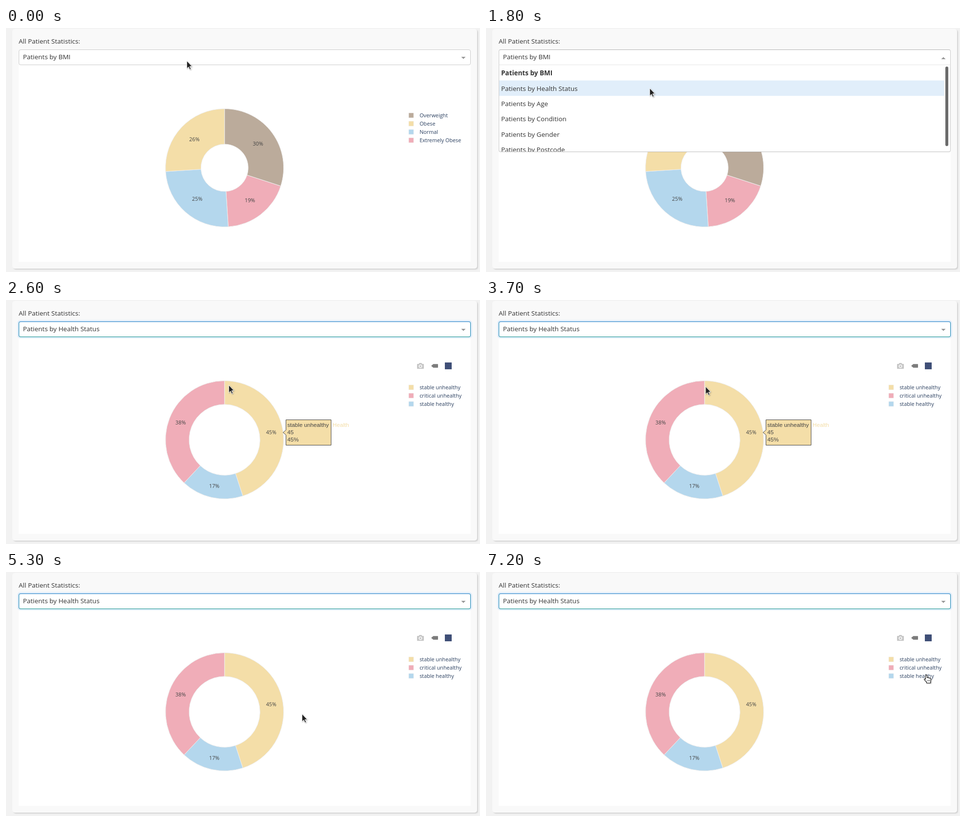
Recreate the animation shown at these times as an HTML page. Size 971x500 px, loop 8000 ms.

```html
<!DOCTYPE html>
<html lang="en">
<head>
<meta charset="utf-8">
<title>Patient statistics</title>
<style>
  html, body { margin: 0; width: 100%; height: 100%; overflow: hidden; background: #f2f2f2; }
  div { position: absolute; box-sizing: border-box; }
  .panel { left: 13px; top: 2px; width: 952px; height: 491px; border-radius: 5px; background: #f9f9f9; box-shadow: 2px 2px 2px lightgrey; }
  .plot { left: 26px; top: 76px; width: 926px; height: 403px; background: #fff; }
  .select { left: 26px; top: 44px; width: 926px; height: 32px; border: 1px solid #ccc; border-radius: 4px; background: #fff; }
  .select.open { border-color: #b3b3b3 #ccc #e2e2e2; border-radius: 4px 4px 0 0; }
  .select.focus { border-color: #1478c4 #1282ae #0b8c86; box-shadow: 0 0 0 3px rgba(0, 126, 255, .1); }
  .menu { left: 26px; top: 75px; width: 926px; height: 179px; border: 1px solid #ccc; border-top-color: #e6e6e6; border-radius: 0 0 4px 4px; background: #fff; box-shadow: 0 1px 0 rgba(0, 0, 0, .06); }
  svg { position: absolute; left: 0; top: 0; font-family: "Open Sans", sans-serif; }
  .ui { font-size: 13.5px; fill: #333; }
  .chart { font-size: 10.8px; }
  .tip { font: 11.7px "Liberation Sans", Arial, sans-serif; }
</style>
</head>
<body>
<div class="panel"></div>
<div class="plot"></div>
<div class="select" id="select"></div>
<svg width="971" height="500" viewBox="0 0 971 500">
  <g class="ui">
    <text x="26" y="32">All Patient Statistics:</text>
    <text id="value" x="34.7" y="64"></text>
  </g>
  <path id="caret" fill="#999"/>
  <g id="bmi" class="chart"></g>
  <g id="status" class="chart"></g>
  <g id="modebar">
    <path fill="#444" opacity=".3" fill-rule="evenodd" d="M843 131h2.500l1.200-2h4.600l1.200 2h2.500q1 0 1 1v8q0 1-1 1h-12q-1 0-1-1v-8q0-1 1-1z M849 132.200a3.500 3.500 0 1 0 .01 0z M849 133.700a2 2 0 1 1-.01 0z"/>
    <path fill="#444" opacity=".7" d="M871 135l4.300-3.700h9q.7 0 .7.700v6q0 .7-.7.700h-9z"/>
    <rect x="899" y="128" width="14" height="14" fill="#3f4f77"/>
  </g>
  <g id="tips" class="tip"></g>
</svg>
<div class="menu" id="menu"></div>
<svg width="971" height="500" viewBox="0 0 971 500">
  <clipPath id="inside"><rect x="27" y="76" width="924" height="177.300"/></clipPath>
  <g id="list" class="ui" clip-path="url(#inside)">
    <rect id="highlight" x="27" width="911.500" height="31.500" fill="#e1eefa"/>
    <rect x="941" y="79" width="6" height="163" rx="3" fill="#6b6b6b"/>
  </g>
  <g id="arrow" style="filter:drop-shadow(1px 1px 1px rgba(0,0,0,.3))">
    <path d="M.3.3V16.200L4 12.800l2.500 5.600 2.500-1.100-2.500-5.500h4.700z" fill="#222" stroke="#fff" stroke-width="1"/>
  </g>
  <g id="hand" style="filter:drop-shadow(1px 1px 1px rgba(0,0,0,.3))">
    <path d="M5.500 10V2.400a1.500 1.500 0 0 1 3 0V6.500l1.500-.3 1 .8 1.500-.2 1 .9 1.200-.1q1.800.4 1.800 2.600l-.8 4V17.500H7.500V15.500L3 10.800q-.8-1.500.7-1.900Q4.600 8.800 5.500 10z" fill="#fff" stroke="#222" stroke-width="1.200" stroke-linejoin="round"/>
    <path d="M9 14v-3M11.500 14v-3M13.500 14v-3" stroke="#222" stroke-width=".7"/>
  </g>
</svg>
<script>
const $ = id => document.getElementById(id);
const LOOP = 8000, STEP = 100;
const CX = 447.7, CY = 286.5, R = 121;
const BROWN = '#bbab9b', YELLOW = '#f4dea8', BLUE = '#b4d7ed', PINK = '#f0adb8';

const add = (parent, markup) => parent.insertAdjacentHTML('beforeend', markup);
const show = (el, on) => { el.style.display = on ? '' : 'none'; };
const text = (x, y, s, attrs = '') => `<text x="${x}" y="${y}" ${attrs}>${s}</text>`;
const polar = (share, r) => {
  const a = share * Math.PI / 50;
  return [CX + r * Math.sin(a), CY - r * Math.cos(a)];
};

// Slices are [name, percent, colour], clockwise from the top.
function donut(group, slices, hole) {
  const inner = R * hole, mid = (R + inner) / 2;
  let from = 0;
  const centres = {};
  for (const [name, pct, color] of slices) {
    const to = from + pct;
    add(group, `<path d="M${polar(from, R)}A${R} ${R} 0 0 1 ${polar(to, R)}L${polar(to, inner)}
      A${inner} ${inner} 0 0 0 ${polar(from, inner)}z" fill="${color}" stroke="#eee"/>`);
    const [x, y] = centres[name] = polar(from + pct / 2, mid);
    add(group, text(x, y + 3.9, pct + '%', 'text-anchor="middle" fill="#444"'));
    from = to;
  }
  [...slices].sort((a, b) => b[1] - a[1]).forEach(([name, , color], i) => {
    const y = Math.round(179 + 17.1 * i);
    add(group, `<rect x="825" y="${y - 5}" width="10" height="10" fill="${color}" stroke="#eee" stroke-width=".6"/>`);
    add(group, text(847.2, y + 4, name, 'fill="#2a3f5f"'));
  });
  return centres;
}

const statusSlices = [['stable unhealthy', 45, YELLOW], ['stable healthy', 17, BLUE], ['critical unhealthy', 38, PINK]];
donut($('bmi'), [['Overweight', 30, BROWN], ['Extremely Obese', 19, PINK], ['Normal', 25, BLUE], ['Obese', 26, YELLOW]], .4);
const centres = donut($('status'), statusSlices, .6);

const tipWidths = { 'stable unhealthy': 92.5, 'stable healthy': 79.5, 'critical unhealthy': 94.5 };
const tips = statusSlices.map(([name, pct, color]) => {
  const [cx, cy] = centres[name], w = tipWidths[name];
  const side = cx > CX ? 1 : -1;
  const x = cx + side * 24.2, y = Math.round(cy) + .5;
  const near = Math.round(x + side * 5) + .5, far = near + side * w;
  const left = Math.min(near, far) + 2.7;
  add($('tips'), `<g><path d="M${x} ${y}L${near} ${y - 5}V${y - 26}H${far}V${y + 26}H${near}V${y + 5}z" fill="${color}" stroke="#444"/>
    ${[name, pct, pct + '%'].map((s, i) => text(left, y - 11.5 + 15 * i, s, 'fill="#444"')).join('')}
    ${text(far + side * 3, y - 11.5, 'Health', `fill="${color}" text-anchor="${side > 0 ? 'start' : 'end'}"`)}</g>`);
  return $('tips').lastElementChild;
});

['BMI', 'Health Status', 'Age', 'Condition', 'Gender', 'Postcode'].forEach((s, i) =>
  add($('list'), text(30.9, Math.round(97.2 + 31.4 * i), 'Patients by ' + s, i ? '' : 'font-weight="700"')));

// Pointer stops: time, x, y
const stops = [
  [0, 370, 67], [600, 370, 67], [700, 369, 60], [1100, 369, 60], [1500, 335, 123],
  [2100, 335, 123], [2600, 456, 174], [3600, 456, 174], [3700, 449.5, 177], [4000, 424, 185],
  [4500, 424, 185], [4600, 393, 209], [4800, 412, 399], [5100, 412, 399], [5500, 800, 182],
  [5600, 866, 193], [5700, 866, 193], [6000, 880, 198], [6200, 897, 214], [6300, 897, 214],
  [6400, 903, 210], [6600, 903, 210], [6800, 906, 192], [6900, 906, 192], [7200, 895, 210], [LOOP, 895, 210]
];
function pointerAt(t) {
  const i = stops.findIndex(s => s[0] > t);
  const [t0, x0, y0] = stops[i - 1], [t1, x1, y1] = stops[i];
  const k = (t - t0) / (t1 - t0);
  return [x0 + (x1 - x0) * k, y0 + (y1 - y0) * k];
}

function draw(now) {
  const t = Math.floor(now % LOOP / STEP) * STEP;
  const within = (a, b) => t >= a && t < b;
  const open = within(700, 1900), chosen = t >= 1900, updated = t >= 2000;
  const [x, y] = pointerAt(t);

  $('select').className = 'select' + (open ? ' open' : chosen ? ' focus' : '');
  $('value').textContent = 'Patients by ' + (chosen ? 'Health Status' : 'BMI');
  $('caret').setAttribute('d', open ? 'M932.500 64h9l-4.500-4.500z' : 'M932.500 59h9l-4.500 4.500z');
  show($('menu'), open);
  show($('list'), open);
  $('highlight').setAttribute('y', y > 107 ? 107.5 : 76);

  show($('bmi'), !updated);
  show($('status'), updated);
  $('modebar').style.opacity = Math.min(1, Math.max(0, (t - 1830) / 300));
  show(tips[0], within(2600, 3800));
  show(tips[1], within(4800, 5200));
  show(tips[2], within(3800, 4600));

  const hand = t >= 5600;
  show($('arrow'), !hand);
  show($('hand'), hand);
  $(hand ? 'hand' : 'arrow').setAttribute('transform', `translate(${x} ${y})`);
}

const start = performance.now();
function tick() {
  draw(performance.now() - start);
  requestAnimationFrame(tick);
}
tick();
</script>
</body>
</html>
```
